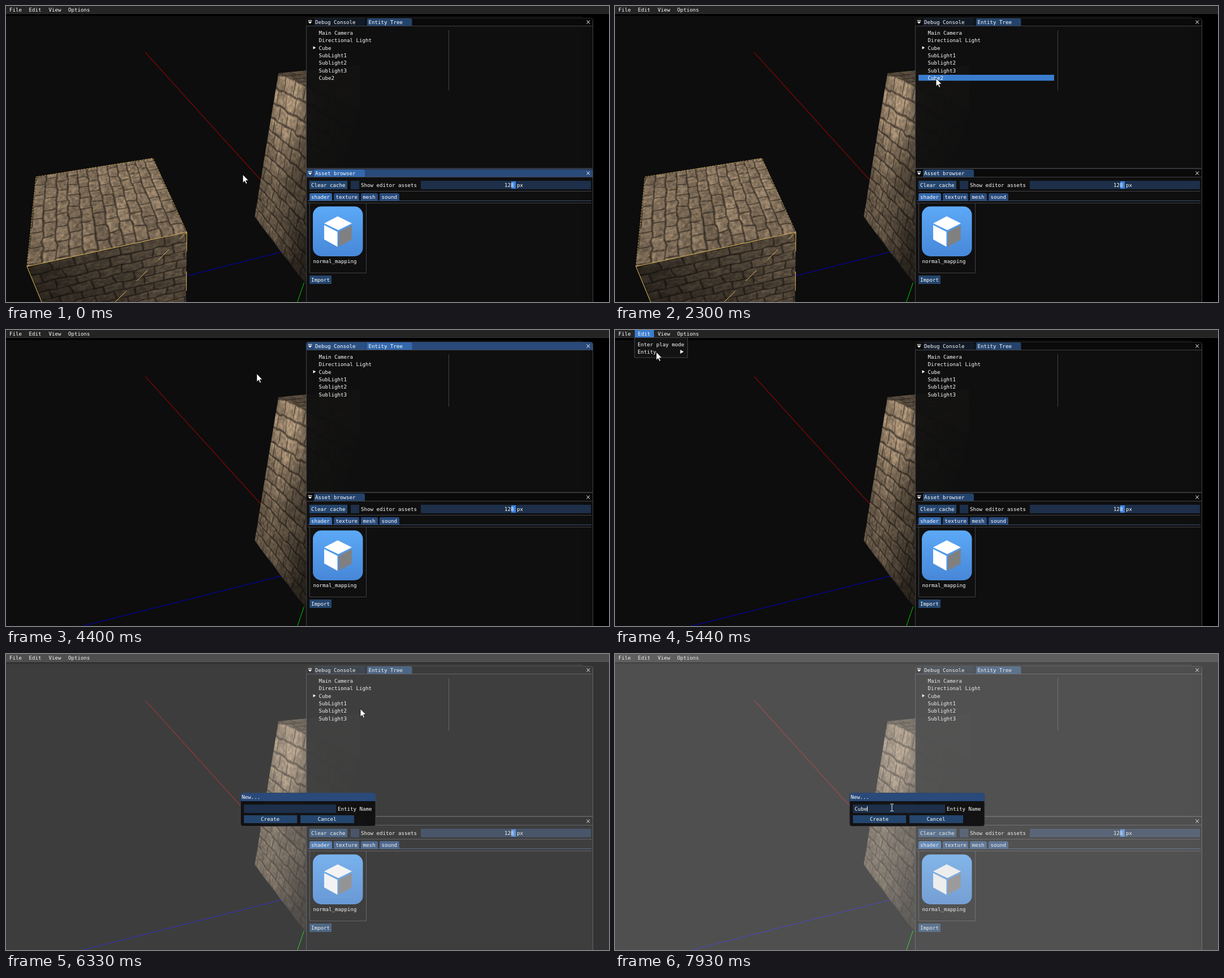
Recreate the animation shown at these times as an HTML page with a canvas. Size 1067 by 525 pixels, loop 8 s.

```html
<!DOCTYPE html>
<html lang="en">
<head>
<meta charset="utf-8">
<title>Scene editor</title>
<style>
html, body { margin: 0; width: 100%; height: 100%; overflow: hidden; background: #000; }
canvas, svg { position: absolute; left: 0; top: 0; width: 1067px; height: 525px; display: block; }
text { font: 9.14px "DejaVu Sans Mono", monospace; fill: #fff; white-space: pre; }
.bar { fill: #0a0a0a; } .on .bar { fill: #294a7a; }
.tab { fill: #111a26; } .on .tab { fill: #2a4f83; }
.tab.cur { fill: #23436c; } .on .tab.cur { fill: #3368ad; }
.line { stroke: #42424a; fill: none; }
.panel { stroke: #42424a; fill: #0f0f0f; fill-opacity: .94; }
.menu { fill: #242424; }
.hot { fill: #3a7dce; }
.sel { fill: #1f3958; }
.field { fill: #1d2f49; }
.btn { fill: #24456d; }
.popup { fill: #141414; fill-opacity: .94; stroke: #42424a; }
#wires path { stroke: #e6be5f; fill: none; }
</style>
</head>
<body>
<canvas id="scene" width="1067" height="525"></canvas>
<canvas id="box" width="1067" height="525"></canvas>
<svg id="ui" viewBox="0 0 1067 525"></svg>
<script>
const W = 1067, H = 525, LOOP = 8000;
const $ = id => document.getElementById(id);

// ---------- stone blocks ----------
const fract = v => v - Math.floor(v);
const clamp = v => Math.max(0, Math.min(1, v));
const hash = (x, y) => fract(Math.sin(x * 127.1 + y * 311.7) * 43758.5453);

function noise(x, y) {
  const i = Math.floor(x), j = Math.floor(y);
  let a = x - i, b = y - j;
  a *= a * (3 - 2 * a);
  b *= b * (3 - 2 * b);
  const top = hash(i, j) * (1 - a) + hash(i + 1, j) * a;
  const low = hash(i, j + 1) * (1 - a) + hash(i + 1, j + 1) * a;
  return top * (1 - b) + low * b;
}

const grain = (x, y) => noise(x, y) * .5 + noise(x * 2.1, y * 2.1) * .3 + noise(x * 4.3, y * 4.3) * .2;

// Brightness of a rough brick wall on the unit square, about 1 on average
function stone(u, v) {
  const y = v * 12 + (noise(u * 16, v * 16) - .5) * .22;
  const row = Math.floor(y);
  const x = u * 7 + (row & 1) * .5 + hash(row, 9) * .25 + (noise(u * 15 + 40, v * 19) - .5) * .14;
  const col = Math.floor(x), fx = x - col, fy = y - row;
  const edge = Math.min(Math.min(fx, 1 - fx) * 1.6, fy, 1 - fy);
  const body = .5 + .5 * clamp((edge - .01) / .1);
  const rim = 1 + .1 * clamp(1 - Math.abs(fy - .18) * 8);
  return body * rim * (.9 + .2 * hash(col, row)) * (.68 + .7 * grain(u * 42, v * 52));
}

function unproject([[x0, y0], [x1, y1], [x2, y2], [x3, y3]]) {
  const sx = x0 - x1 + x2 - x3, sy = y0 - y1 + y2 - y3;
  const ax = x1 - x2, bx = x3 - x2, ay = y1 - y2, by = y3 - y2, den = ax * by - bx * ay;
  const g = (sx * by - bx * sy) / den, h = (ax * sy - sx * ay) / den;
  const a = x1 - x0 + g * x1, b = x3 - x0 + h * x3, c = x0;
  const d = y1 - y0 + g * y1, e = y3 - y0 + h * y3, f = y0;
  return (x, y) => {
    const w = (d * h - e * g) * x + (b * g - a * h) * y + a * e - b * d;
    return [((e - f * h) * x + (c * h - b) * y + b * f - c * e) / w,
            ((f * g - d) * x + (a - c * g) * y + c * d - a * f) / w];
  };
}

function face(ctx, quad, light) {
  const xs = quad.map(p => p[0]), ys = quad.map(p => p[1]);
  const l = Math.floor(Math.min(...xs)), t = Math.floor(Math.min(...ys));
  const w = Math.min(627, Math.ceil(Math.max(...xs))) - l;
  const h = Math.min(H, Math.ceil(Math.max(...ys))) - t;
  const tmp = document.createElement('canvas');
  tmp.width = w;
  tmp.height = h;
  const pen = tmp.getContext('2d'), img = pen.createImageData(w, h), at = unproject(quad);
  for (let i = 0; i < w * h; i++) {
    let sum = 0, hits = 0;
    for (let s = 0; s < 4; s++) {
      const [u, v] = at(l + i % w + .25 + (s & 1) * .5, t + Math.floor(i / w) + .25 + (s >> 1) * .5);
      if (u < 0 || u > 1 || v < 0 || v > 1) continue;
      hits++;
      sum += stone(u, v) * light(u, v);
    }
    if (hits) img.data.set([122, 105, 85].map(k => k * sum / hits).concat(hits * 63.75), i * 4);
  }
  pen.putImageData(img, 0, 0);
  ctx.drawImage(tmp, l, t);
}

function stroke(ctx, color, x0, y0, x1, y1) {
  ctx.strokeStyle = color;
  ctx.beginPath();
  ctx.moveTo(x0 + .5, y0 + .5);
  ctx.lineTo(x1 + .5, y1 + .5);
  ctx.stroke();
}

const scene = $('scene').getContext('2d');
scene.fillRect(0, 0, W, H);
scene.fillStyle = '#0d0d0d';
scene.fillRect(0, 18, 1020, H);
stroke(scene, '#d00000', 246, 82, 452, 310);
stroke(scene, '#0000c8', 133, 525, 490, 435);
stroke(scene, '#00d000', 527, 490, 515, 525);
face(scene, [[482, 119], [627, 105], [760, 165], [627, 185]], () => .7);
face(scene, [[482, 119], [627, 185], [531, 495], [440, 374]],
  (u, v) => .9 + .4 * Math.exp(-12 * ((u - .2) ** 2 + (v - .15) ** 2)) - .8 * clamp(u - .3) - .1 * v);

const box = $('box').getContext('2d');
face(box, [[53, 303], [37, 462], [320, 401], [260, 270]], (u, v) => 1 + .1 * v - .08 * u);
face(box, [[37, 462], [320, 401], [318, 560], [100, 615]], (u, v) => .38 + .32 * u - .08 * v);

// ---------- interface ----------
const text = (x, mid, s, id = '') => `<text x="${x}" y="${mid + 3.3}" id="${id}">${s}</text>`;
const rect = (x, y, r, b, cls, id = '') =>
  `<rect x="${x}" y="${y}" width="${r - x}" height="${b - y}" class="${cls}" id="${id}"/>`;
const path = (d, attrs = 'fill="#fff"') => `<path d="${d}" ${attrs}/>`;
const group = (id, ...parts) => `<g id="${id}">${parts.join('')}</g>`;
const arrow = (x, y, s) => path(`M${x} ${y - s}l${s * 1.7} ${s}l${-s * 1.7} ${s}z`);
const tab = (x, y, r, attrs) => path(`M${x} ${y + 13}V${y + 3}q0-3 3-3H${r - 3}q3 0 3 3V${y + 13}z`, attrs);
const rows = (x, y, list) => list.map((s, i) => text(x, y + i * 13.4, s)).join('');
const button = (x, y, r, b, s, tx) => rect(x, y, r, b, 'btn') + text(tx, (y + b) / 2, s);

const chrome = y =>
  path(`M531.5 ${y + 14}V${y + 4}q0-4 4-4H1034q4 0 4 4V${y + 14}z`, 'class="bar"') +
  path(`M534.5 ${y + 3.5}h7v1h-7zm0 2.5h7l-3.5 4z`) +
  path(`M1027.5 ${y + 4}l5.5 6m0-6l-5.5 6`, 'stroke="#fff" fill="none"') +
  path(`M532 ${y + 14}H1038`, 'class="line"');

const treeWin = group('tree',
  path('M531.5 288V25.5q0-4 4-4H1034.5q4 0 4 4V288z', 'class="panel"'),
  chrome(21.5),
  tab(545, 22, 636, 'class="tab"'), tab(638.5, 22, 718.5, 'class="tab cur"'),
  text(547, 28.5, 'Debug Console'), text(641.5, 28.5, 'Entity Tree'),
  rect(537, 122, 777, 132.5, 'sel', 'row'),
  rows(553.5, 47.5, ['Main Camera', 'Directional Light', 'Cube', 'SubLight1', 'Sublight2', 'Sublight3']),
  text(553.5, 128, 'Cube2', 'cube2'), arrow(543.5, 74, 2.8),
  '<path id="split" class="line"/>',
  group('inspect',
    rect(789, 42, 952, 57, 'field'), text(792, 49.5, 'Cube2'), text(956, 49.5, 'Entity name'),
    ['Material', 'StaticMesh', 'Transform'].map((s, i) =>
      rect(787, 61 + i * 18, 1032, 75 + i * 18, 'sel') +
      arrow(794.5, 68 + i * 18, 3.5) + text(808.5, 68 + i * 18, s)).join('')));

const assetWin = group('assets',
  path('M531.5 530V288.5H1038.5V530z', 'class="panel"'),
  chrome(289.5), tab(545, 290, 635, 'class="tab cur"'), text(547, 296.5, 'Asset browser'),
  button(537, 310, 604, 325, 'Clear cache', 540), rect(610, 310, 625, 325, 'field'),
  text(628, 317.5, 'Show editor assets'),
  rect(734, 310, 1035, 325, 'field'), '<rect x="894" y="311" width="8" height="13" fill="#3d85e0"/>',
  text(882, 317.5, '128 px'),
  path('M537 328.5H1036M534 349.5H1036M537.5 349.5V473.5H637.5V349.5', 'class="line"'),
  path('M534 345.5H1036', 'stroke="#3b5273"'),
  tab(537, 332, 577, 'fill="#3368ad"'), tab(580, 332, 625, 'id="texture"'),
  tab(628, 332, 658, 'fill="#27497a"'), tab(661, 332, 696, 'fill="#27497a"'),
  text(540, 339, 'shader'), text(583.5, 339, 'texture'), text(631.5, 339, 'mesh'), text(664.5, 339, 'sound'),
  '<rect x="543" y="355.5" width="88.5" height="88.5" rx="15" fill="url(#sky)"/>',
  path('M587 373l25 12.5l-24 12l-25-12zM563 388.5l23.5 12v26.5l-23.5-13z'),
  path('M589 400.5l23-12l-.5 26l-22.5 12.5z', 'fill="#808080"'),
  text(543.5, 453, 'normal_mapping'), button(537, 478, 576, 493, 'Import', 540));

const context = group('context',
  rect(569.5, 129.5, 687.5, 177.5, 'popup'), rect(572, 147, 685, 160.5, 'hot', 'pick'),
  rows(575.5, 140.5, ['Delete entity', 'Duplicate entity', 'Add Component']), arrow(675, 167, 3.5),
  group('parts', rect(687.5, 155.5, 798.5, 271.5, 'popup'),
    rows(694, 167, ['Camera', 'DirectionalLight', 'Material', 'PointLight', 'Script', 'Sound', 'StaticMesh', 'Transform'])));

const menu = rect(0, 0, W, 13, 'menu') +
  path('M0 13.5H1067', 'stroke="#34343a"') + rect(35, 0, 69, 13, 'hot', 'edit') +
  group('drop', rect(34.5, 13.5, 128.5, 49, 'popup'), rect(37, 18.5, 126, 32, 'hot', 'dropPick'),
    rows(40, 25.5, ['Enter play mode', 'Entity']), arrow(115.5, 38.5, 3.5),
    group('sub', rect(128.5, 27.5, 184, 62.5, 'popup'), rect(131, 32, 182, 45.5, 'hot', 'subPick'),
      rows(134.5, 39, ['New...', 'Delete']))) +
  text(6, 6.5, 'File') + text(40.5, 6.5, 'Edit') + text(75.5, 6.5, 'View') + text(110, 6.5, 'Options');

const modal = group('modal',
  '<rect x="415" y="246.5" width="239" height="59" rx="4" fill="#101010" fill-opacity=".96" stroke="#45454d"/>',
  path('M415.5 261V250.5q0-4 4-4H650q4 0 4 4V261z', 'fill="#294a7a"'),
  text(417, 254, 'New...'), rect(421, 267, 584, 282, 'field'), text(587, 275, 'Entity Name'),
  button(421, 286, 515, 300, 'Create', 451), button(521, 286, 616, 300, 'Cancel', 551.5),
  text(424, 275, '', 'typed'), path('M0 270v9', 'id="caret" stroke="#fff"'));

const wires = group('wires',
  path('M63 525L37 462L320 401'), path('M320 401L319 525', 'stroke-dasharray="34 36"'),
  path('M37 462L53 303L260 270L320 401', 'stroke-dasharray="3 2" stroke-opacity=".75"'),
  path('M37 462L260 270', 'stroke-dasharray="5 4" stroke-opacity=".55"'),
  path('M320 401L193 525', 'stroke-dasharray="27 26" stroke-dashoffset="9"'));

$('ui').innerHTML =
  '<linearGradient id="sky" x2="0" y2="1"><stop stop-color="#5ca9f7"/><stop offset="1" stop-color="#4787d8"/></linearGradient>' +
  wires + treeWin + assetWin + context + menu +
  `<rect id="dim" width="${W}" height="${H}" fill="#ccc"/>` + modal +
  path('M0 0V14.5L3.3 11.5L5.6 16.5L7.8 15.5L5.6 10.6H10.2z', 'id="arrow" fill="#fff" stroke="#000" stroke-width=".8"') +
  path('M-3-6H-.5M.5-6H3M0-5.5V6M-3 6.5H-.5M.5 6.5H3', 'id="beam" stroke="#fff" fill="none"');

// ---------- motion ----------
// Pointer moves: first step, last step, step count, end point
const moves = [
  [930, 1220, 5, 603, 340], [1290, 1290, 1, 592, 360], [1350, 1680, 5, 585, 233],
  [1740, 2200, 7, 568, 128],
  [2860, 3010, 3, 612, 163], [3085, 3160, 2, 650, 166], [3235, 3310, 2, 614, 146],
  [3680, 3740, 2, 612, 138], [3980, 3980, 1, 600, 106],
  [4330, 4720, 7, 53, 6], [5060, 5290, 4, 66, 33], [5440, 5440, 1, 73, 39],
  [5510, 5860, 6, 150, 39],
  [6150, 6210, 2, 460, 78], [6270, 6270, 1, 575, 91], [6330, 6330, 1, 627, 97],
  [6760, 6760, 1, 490, 271], [7190, 7190, 1, 490, 272]
];

function pointer(t) {
  let x = 419, y = 299;
  for (const [from, to, n, ex, ey] of moves) {
    if (t < from) break;
    const gap = n > 1 ? (to - from) / (n - 1) : 1;
    const k = Math.min(1, (Math.floor((t - from) / gap + 1e-6) + 1) / n);
    x += (ex - x) * k;
    y += (ey - y) * k;
  }
  return [x, y];
}

const show = (id, on) => { $(id).style.display = on ? '' : 'none'; };
const set = (id, name, value) => $(id).setAttribute(name, value);

function draw(t) {
  const during = (a, b) => t >= a && t < b;
  const alive = t < 3920, open = during(4720, 4940) || during(5060, 5930);

  set('assets', 'class', t < 590 ? 'on' : '');
  set('tree', 'class', during(2330, 4720) || during(4940, 5060) || during(5930, 6210) ? 'on' : '');
  set('texture', 'fill', during(1290, 1420) ? '#3f86dd' : '#27497a');

  for (const id of ['box', 'wires', 'cube2']) show(id, alive);
  set('split', 'd', `M783.5 43V${alive ? 149.5 : 136}`);
  show('row', during(2200, 3920));
  set('row', 'class', t < 2640 ? 'hot' : 'sel');
  show('inspect', during(2330, 3920));

  show('context', during(2640, 3920));
  show('pick', t >= 2935);
  set('pick', 'y', t >= 3740 ? 133.5 : during(3010, 3235) ? 160.5 : 147);
  show('parts', during(3085, 3310));

  show('edit', during(4655, 5930));
  show('drop', open);
  show('dropPick', during(5175, 5290) || t >= 5510);
  set('dropPick', 'y', t < 5400 ? 18.5 : 32);
  show('sub', t >= 5580);
  show('subPick', t >= 5790);

  show('modal', t >= 6210);
  set('dim', 'opacity', t < 6270 ? 0 : t < 6330 ? .11 : t < 6760 ? .246 : .35);
  const typed = 'Cube'.slice(0, t < 7690 ? 0 : t < 7780 ? 1 : t < 7930 ? 2 : 4);
  $('typed').textContent = typed;
  show('caret', t >= 7190);
  set('caret', 'transform', `translate(${424.5 + Math.round(typed.length * 5.5)} 0)`);

  const [x, y] = pointer(t), at = `translate(${x.toFixed(1)} ${y.toFixed(1)})`;
  show('arrow', t < 6760);
  show('beam', t >= 6760);
  set('arrow', 'transform', at);
  set('beam', 'transform', at);
}

const start = performance.now();
function tick() {
  draw((performance.now() - start) % LOOP);
  requestAnimationFrame(tick);
}
draw(0);
requestAnimationFrame(tick);
</script>
</body>
</html>
```
